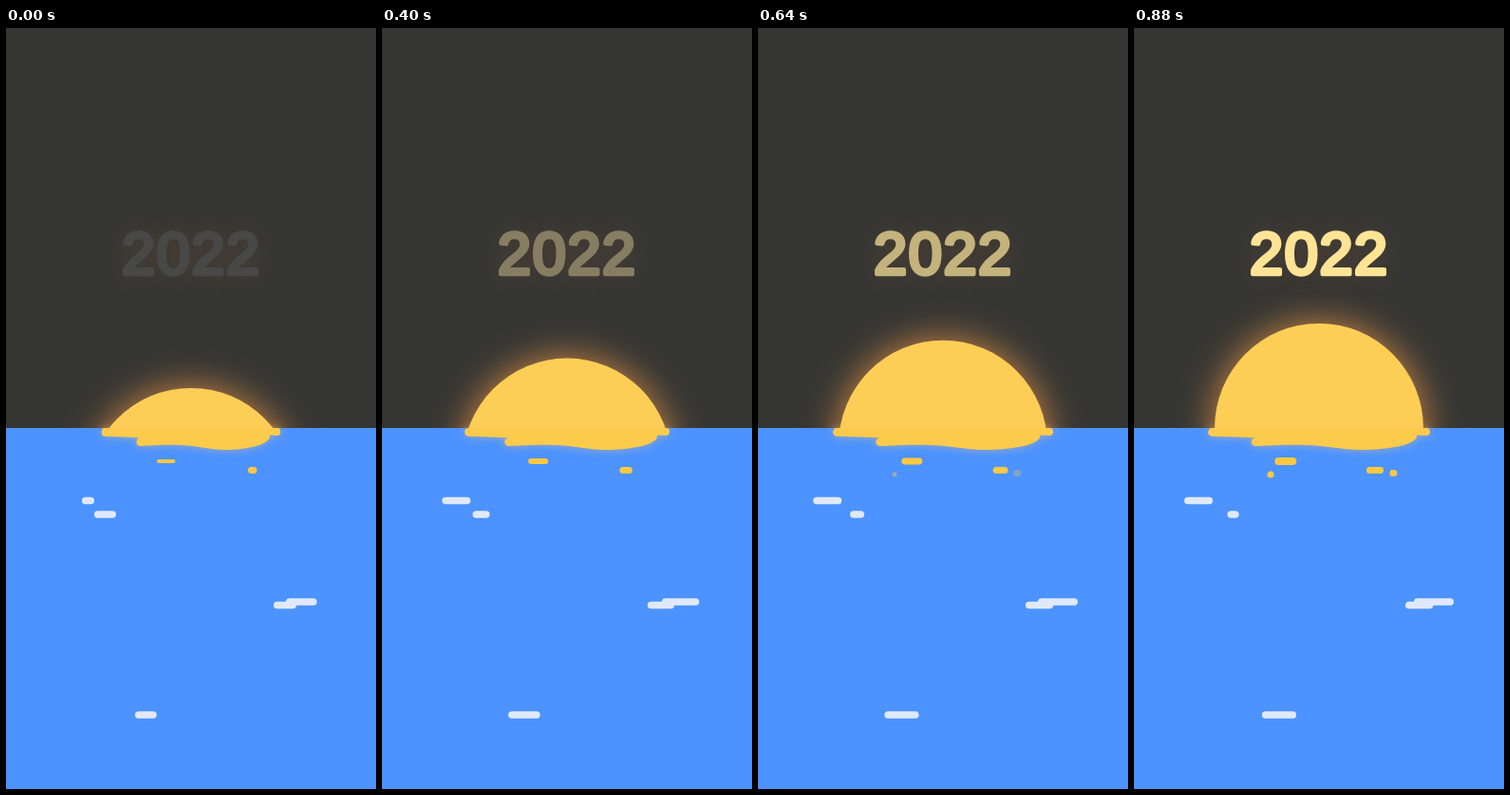
These frames come from a looping animation (390 by 801 pixels, 0.92 s). An HTML page with a canvas:

```html
<!DOCTYPE html>
<html>
<head>
<meta charset="utf-8">
<style>
  html, body { margin: 0; height: 100%; overflow: hidden; background: #353633; }
  canvas { display: block; }
</style>
</head>
<body>
<canvas id="stage" width="390" height="801"></canvas>
<script>
const ctx = document.getElementById('stage').getContext('2d');
const LOOP = 920, STEP = 40;
const HORIZON = 421, CENTER = 195, RADIUS = 110;
const SKY = '#353633', SEA = '#4c93ff', YELLOW = '#fec842', FOAM = '#dfe9fb';

// The sun's reflection on the waterline at full width
const shore = new Path2D(`M82.5 421 H308 a4 4 0 0 1 0 8 L298 428.5
  C300 439 266 444 240 444 C215 444 205 438 160 438.8 L128 440
  C122.5 440 122.5 432 128 431.3 H135 Q120 431 82.5 429.8
  a4.4 4.4 0 0 1 0 -8.8 Z`);

const ramp = (t, from, to) => Math.min(1, Math.max(0, (t - from) / (to - from)));
const mix = (a, b, k) => a + (b - a) * k;

function glow(color, blur) {
  ctx.shadowColor = color;
  ctx.shadowBlur = blur;
}

// Horizontal pill, centred on y
function pill(color, left, right, y, height) {
  ctx.fillStyle = color;
  ctx.beginPath();
  ctx.roundRect(left, y - height / 2, right - left, height, Math.min(height, right - left) / 2);
  ctx.fill();
}

// Ends move at their own speeds (px/s) until the turn, then the whole dash drifts
function dash(color, t, x, y, width, leftSpeed, rightSpeed, turn = LOOP, drift = 0) {
  const growing = Math.min(t, turn) / 1000;
  const shift = drift * Math.max(0, t - turn) / 1000;
  pill(color, x + leftSpeed * growing + shift, x + width + rightSpeed * growing + shift, y, 7.5);
}

function sparkle(x, y, alpha, size) {
  ctx.globalAlpha = alpha;
  pill(YELLOW, x - size / 2, x + size / 2, y, Math.min(size, 7));
  ctx.globalAlpha = 1;
}

function year(t) {
  const k = ramp(t, 160, 860);
  ctx.save();
  ctx.font = '63px "Liberation Sans", Arial, sans-serif';
  ctx.letterSpacing = '1.6px';
  ctx.lineJoin = 'round';
  ctx.lineWidth = 4.4;
  ctx.fillStyle = ctx.strokeStyle = `rgb(${mix(72, 255, k)}, ${mix(72, 228, k)}, ${mix(71, 150, k)})`;
  glow('rgba(255, 150, 80, 0.14)', 26);
  ctx.strokeText('2022', 122.1, 259);
  glow('transparent', 0);
  ctx.fillText('2022', 122.1, 259);
  ctx.restore();
}

function sun(t) {
  ctx.save();
  ctx.fillStyle = '#fdce55';
  glow('rgba(255, 160, 75, 0.78)', 38);
  ctx.beginPath();
  ctx.arc(CENTER, HORIZON + 68 * (1 - ramp(t, 0, 866)), RADIUS, 0, 2 * Math.PI);
  ctx.fill();
  ctx.restore();
}

function reflection(t) {
  ctx.save();
  ctx.translate(CENTER, 0);
  ctx.scale(mix(0.806, 1, ramp(t, 0, 666)), 1);
  ctx.translate(-CENTER, 0);
  ctx.fillStyle = '#fdcb4b';
  glow('rgba(255, 200, 110, 0.5)', 10);
  ctx.fill(shore);
  ctx.restore();
}

function glints(t) {
  pill(YELLOW, 159 - 0.0121 * t, 178.5 - 0.0082 * t, 456, 4.2 + 0.0043 * t);
  pill(YELLOW, 255 - 0.0114 * t, 264.5 - 0.0016 * t, 465.5, 7);
  const rise = ramp(t, 450, 850);
  sparkle(144, 470, rise, mix(3, 7, rise));
  sparkle(273.4, 468.5, ramp(t, 530, 870), 8);
}

function foam(t) {
  dash(FOAM, t, 80, 497.5, 13, -43.5, 2.7, 368, -21.5);
  dash(FOAM, t, 93, 512, 23, 6.2, -6.2);
  dash(FOAM, t, 295, 604, 32.7, 0, 16.6, 560);
  dash(FOAM, t, 282, 607.5, 24, -5.3, 5.5, 490, 17);
  dash(FOAM, t, 136, 723, 22.8, -7.2, 19.6, 500, 6.5);
}

function draw(t) {
  ctx.fillStyle = SKY;
  ctx.fillRect(0, 0, 390, HORIZON);
  year(t);
  sun(t);
  ctx.fillStyle = SEA;
  ctx.fillRect(0, HORIZON, 390, 380);
  reflection(t);
  glints(t);
  foam(t);
}

function tick() {
  const t = performance.now() % LOOP;
  draw(Math.floor(t / STEP) * STEP);
  requestAnimationFrame(tick);
}
tick();
</script>
</body>
</html>
```
